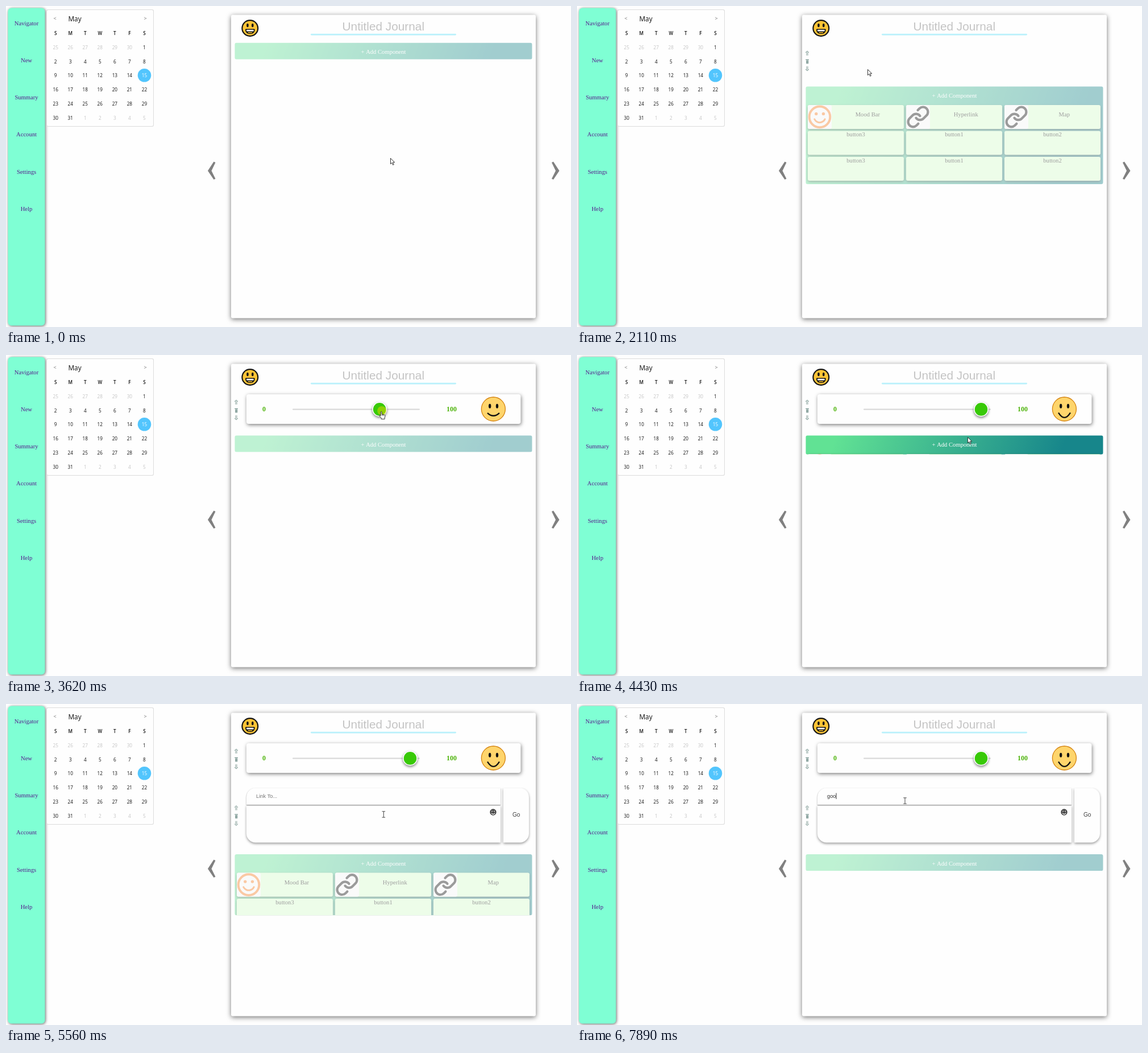
Recreate the animation shown at these times as an HTML page with a canvas. Size 994 by 564 pixels, loop 7.99 s.

```html
<!DOCTYPE html>
<html lang="en">
<head>
<meta charset="utf-8">
<title>Journal editor</title>
<style>
html, body { margin: 0; width: 100%; height: 100%; overflow: hidden; background: #fefefe; }
canvas { display: block; }
</style>
</head>
<body>
<canvas id="stage" width="994" height="564"></canvas>
<script>
const LOOP = 7990;
const SERIF = '"Liberation Serif", serif';
const SANS = '"Liberation Sans", sans-serif';
const UI = '"Open Sans", sans-serif';
const stage = document.getElementById('stage');
const screen = stage.getContext('2d');
const layer = document.createElement('canvas');
layer.width = stage.width;
layer.height = stage.height;
const layerCtx = layer.getContext('2d');
let c = screen;

const LINK = new Path2D('M10 13a5 5 0 0 0 7.54.54l3-3a5 5 0 0 0-7.07-7.07l-1.72 1.71' +
  'M14 11a5 5 0 0 0-7.54-.54l-3 3a5 5 0 0 0 7.07 7.07l1.71-1.71');
const ARROW = new Path2D('M.5 .5V10.6L2.9 8.4L4.6 12.3L6.3 11.6L4.6 7.8H7.8Z');
const HAND = new Path2D('M-1 1Q0-.6 1 1V5.2L5.5 6.2Q7 6.6 6.8 8.2L6 11V13.6H0V11.8L-3.4 8Q-4 6.6-2.4 6.7L-1 8Z');

// Panel: [time, top]; hover: [open, close]
const TOPS = [[0, 64.5], [2100, 141.3], [5425, 264]];
const HOVERS = [[840, 2103], [4408, 5425]];
const CURSORS = [[0, 'arrow'], [1000, 'lightBeam'], [1450, 'arrow'], [1750, 'hand'], [2100, 'arrow'],
  [2650, 'hand'], [4200, 'arrow'], [4600, 'hand'], [5425, 'beam']];
const MOUSE = [[0, 676, 267], [129, 676, 267], [130, 675.5, 267], [330, 675.5, 267], [410, 668, 256],
  [610, 668, 256], [860, 690, 88], [1120, 701, 81], [1450, 701, 81], [1800, 545, 112],
  [2050, 511, 111], [2240, 511, 111], [2750, 619, 100], [2800, 619, 100], [3080, 578, 99],
  [3260, 557, 99], [3410, 557, 99], [3620, 660, 99], [3850, 709, 98], [4000, 714, 98],
  [4150, 714, 98], [4430, 687, 144], [4700, 672, 168], [4920, 665, 177], [5070, 664, 193],
  [5560, 664.5, 194], [6090, 580, 173], [6260, 579, 172], [6540, 579, 172], [6640, 577, 170]];
const TYPED = [[0, ''], [7380, 'g'], [7710, 'go'], [7890, 'goo']];

const at = (list, t) => list.filter(k => k[0] <= t).pop()[1];

function mouseAt(t) {
  const i = MOUSE.findIndex(k => k[0] > t);
  if (i < 0) return MOUSE[MOUSE.length - 1].slice(1);
  const [a, b] = [MOUSE[i - 1], MOUSE[i]];
  const p = (t - a[0]) / (b[0] - a[0]);
  return [a[1] + (b[1] - a[1]) * p, a[2] + (b[2] - a[2]) * p];
}

// cubic-bezier(.25, .1, .25, 1)
function ease(x) {
  if (x <= 0) return 0;
  if (x >= 1) return 1;
  let lo = 0, hi = 1, s = .5;
  for (let i = 0; i < 20; i++) {
    s = (lo + hi) / 2;
    const bx = .75 * s * (1 - s) + s ** 3;
    if (bx < x) lo = s; else hi = s;
  }
  return .3 * s * (1 - s) ** 2 + 3 * s * s * (1 - s) + s ** 3;
}

function text(str, x, y, size, family, color, align = 'center', weight = '') {
  c.font = `${weight} ${size}px ${family}`;
  c.textAlign = align;
  c.fillStyle = color;
  c.fillText(str, x, y);
}

function box(x, y, w, h, r, fill, shadow) {
  c.save();
  if (shadow) [c.shadowOffsetX, c.shadowOffsetY, c.shadowBlur, c.shadowColor] = shadow;
  c.beginPath();
  c.roundRect(x, y, w, h, r);
  c.fillStyle = fill;
  c.fill();
  c.restore();
}

function oval(x, y, rx, ry, fill) {
  c.beginPath();
  c.ellipse(x, y, rx, ry, 0, 0, Math.PI * 2);
  c.fillStyle = fill;
  c.fill();
}

const disc = (x, y, r, fill) => oval(x, y, r, r, fill);

function line(points, color, width) {
  c.beginPath();
  points.forEach(([x, y]) => c.lineTo(x, y));
  c.strokeStyle = color;
  c.lineWidth = width;
  c.stroke();
}

function arc(x, y, r, from, to, color, width) {
  c.beginPath();
  c.arc(x, y, r, from, to);
  c.strokeStyle = color;
  c.lineWidth = width;
  c.stroke();
}

function sidebar() {
  box(3.5, 3.5, 65, 558, 6, '#7fffd4', [1, 1, 5, 'rgba(0,0,0,.6)']);
  ['Navigator', 'New', 'Summary', 'Account', 'Settings', 'Help'].forEach((s, i) =>
    text(s, 36, 34 + i * 65.15, 10.6, SERIF, '#551a8b'));
}

function calendar() {
  box(71, 6, 189, 206, 3, '#dcdcdc');
  box(72, 7, 187, 204, 2.5, '#fefefe');
  text('<', 86, 25, 9, UI, '#777');
  text('>', 245, 25, 9, UI, '#777');
  text('May', 121, 26.5, 11.8, UI, '#111');
  [...'SMTWTFS'].forEach((s, i) => text(s, 87.2 + i * 26.03, 51, 8.2, UI, '#111', 'center', 600));
  disc(243.5, 121.8, 11.8, '#52c5fd');
  for (let i = 0; i < 42; i++) {
    const off = i < 6 || i > 36;
    const day = i < 6 ? 25 + i : (i - 6) % 31 + 1;
    const color = off ? '#c4c4c4' : day === 15 ? '#fff' : '#111';
    text(day, 87.2 + i % 7 * 26.03, 76 + Math.floor(i / 7) * 24.7, 8.2, UI, color);
  }
}

function chevron(x, dir) {
  c.beginPath();
  [[0, 275], [3, 273.5], [13.5, 289.5], [3, 305], [0, 303.5], [7, 289.5]].forEach(([dx, y]) => c.lineTo(x + dir * dx, y));
  c.fillStyle = '#808080';
  c.fill();
}

function page() {
  box(396, 15.5, 536, 533, 3, '#fefefe', [0, 2, 8, 'rgba(0,0,0,.55)']);
  disc(429.3, 39, 15, '#151515');
  disc(429.3, 39, 12.8, '#fcc436');
  oval(425, 34, 1.8, 3.2, '#151515');
  oval(433.8, 34, 1.8, 3.2, '#151515');
  box(421, 40.3, 16.8, 8.8, [1.5, 1.5, 8, 8], '#151515');
  box(423, 41.8, 12.8, 2.6, 1, '#fff');
  box(425.5, 46, 7.8, 1.4, .7, '#fcc436');
  text('Untitled Journal', 663.8, 43, 20.8, SANS, '#c4c4c4');
  box(536, 48.7, 256, 2.7, 1.3, '#b9f1fb');
  chevron(368.5, -1);
  chevron(960, 1);
}

function tools(y) {
  const color = '#71908a';
  [[y, 1], [y + 27, -1]].forEach(([cy, d]) => {
    line([[402.2, cy - d], [405, cy - 4 * d], [407.8, cy - d]], color, 1);
    line([[404, cy - 2 * d], [404, cy + 4 * d]], color, .8);
    line([[406, cy - 2 * d], [406, cy + 4 * d]], color, .8);
  });
  box(402.3, y + 10.7, 5.6, 1.2, 0, color);
  box(403, y + 12.5, 4.4, 6, .8, '#a5b9b5');
  line([[404.3, y + 12.5], [404.3, y + 18]], color, .7);
  line([[406.1, y + 12.5], [406.1, y + 18]], color, .7);
}

function moodBar(knob) {
  box(423, 69, 482.5, 52, 4, '#fefefe', [1, 2, 6, 'rgba(0,0,0,.5)']);
  text('0', 454, 99.3, 12, SERIF, '#4db30a', 'center', 'bold');
  text('100', 784, 99.3, 12, SERIF, '#4db30a', 'center', 'bold');
  box(504, 94.6, 224, 2, 1, '#d6d6d6');
  c.save();
  [c.shadowOffsetY, c.shadowBlur, c.shadowColor] = [2, 4, 'rgba(0,0,0,.5)'];
  disc(knob, 95.4, 13, '#fff');
  c.restore();
  disc(knob, 95.4, 11.3, '#38c908');
  disc(857.4, 95, 21.2, '#ffd56c');
  arc(857.4, 95, 21, 0, 7, '#d48412', 1.3);
  oval(851.2, 89.8, 2.2, 4, '#111');
  oval(864, 89.8, 2.2, 4, '#111');
  const v = (knob - 504) / 224;
  const bend = 17 * (v - .34);
  c.beginPath();
  c.moveTo(847, 102.5 - bend * .12);
  c.quadraticCurveTo(857.5, 102.5 + bend * 1.6, 868, 102.5 - bend * .12);
  c.strokeStyle = '#111';
  c.lineWidth = 2.3;
  c.stroke();
}

function hyperlink(t) {
  const shade = [0, 2, 4, 'rgba(0,0,0,.4)'];
  c.save();
  c.beginPath();
  c.rect(415, 147, 520, 110);
  c.clip();
  box(423, 178, 447, 65.5, [0, 0, 0, 16], '#fefefe', shade);
  box(423, 147.5, 447, 29.5, [16, 0, 0, 0], '#fefefe', [0, 1, 2, 'rgba(0,0,0,.5)']);
  box(875, 147.5, 45, 96, [0, 16, 16, 0], '#fefefe', shade);
  c.restore();
  text('Go', 897.7, 198, 10.2, SANS, '#444');
  disc(857, 190, 5.7, '#484848');
  disc(855, 188.4, .9, '#fff');
  disc(859, 188.4, .9, '#fff');
  arc(857, 190.5, 3, .3, Math.PI - .3, '#fff', 1.1);
  const typed = at(TYPED, t);
  text(typed || 'Link To...', 440, 164.6, 9.3, SANS, typed ? '#333' : '#757575', 'left');
  if (t >= 6540 && t < 7070 || t >= 7380) box(440 + typed.length * 5.2, 156.5, .9, 10.5, 0, '#222');
}

function buttonIcon(x, y, col) {
  box(x, y, 42, 42, 3, '#f5f5f5');
  c.lineCap = 'round';
  if (col === 0) {
    const orange = '#f57c20';
    arc(x + 21, y + 21, 18.3, 0, 7, orange, 4);
    disc(x + 14.8, y + 15.5, 2.7, orange);
    disc(x + 27.5, y + 15.5, 2.7, orange);
    arc(x + 21, y + 20.5, 10.2, .45, Math.PI - .45, orange, 3);
  } else {
    c.save();
    c.translate(x, y);
    c.scale(1.75, 1.75);
    c.strokeStyle = '#0a0a0a';
    c.lineWidth = 2.4;
    c.stroke(LINK);
    c.restore();
  }
  c.lineCap = 'butt';
}

function panel(top, h) {
  const [x, w, turn] = [402.3, 523.4, 110 * Math.PI / 180];
  const [sx, sy] = [Math.sin(turn), -Math.cos(turn)];
  const half = (w * sx + h * sy) / 2;
  const [cx, cy] = [x + w / 2, top + h / 2];
  const g = c.createLinearGradient(cx - sx * half, cy - sy * half, cx + sx * half, cy + sy * half);
  g.addColorStop(.1, '#61e294');
  g.addColorStop(.86, '#17868b');
  c.save();
  c.beginPath();
  c.roundRect(x, top, w, h, 3.5);
  c.clip();
  c.fillStyle = g;
  c.fillRect(x, top, w, h);
  text('+ Add Component', 664, top + 19.6, 10.6, SERIF, '#fff');
  if (h > 30) for (let i = 0; i < 9; i++) {
    const col = i % 3, row = Math.floor(i / 3);
    const bx = 406 + col * 173, by = top + 32.6 + row * 45.5;
    box(bx, by, 169, 42, 3, '#d6fdcc', [0, 2, 4, 'rgba(0,0,0,.6)']);
    if (row) {
      text('button' + [3, 1, 2][col], bx + 84.5, by + 10, 10.6, SERIF, '#111');
    } else {
      buttonIcon(bx, by, col);
      text(['Mood Bar', 'Hyperlink', 'Map'][col], bx + 105.3, by + 20, 10.6, SERIF, '#111');
    }
  }
  c.restore();
}

function addPanel(t) {
  const top = at(TOPS, t);
  let open = 0, hover = false;
  for (const [on, off] of HOVERS) {
    if (t < on) continue;
    hover = t < off;
    open = hover ? ease((t - on) / 500) : 1 - ease((t - off) / 500);
  }
  c = layerCtx;
  c.clearRect(0, 0, layer.width, layer.height);
  panel(top, 29.3 + 143.5 * open);
  c = screen;
  c.globalAlpha = hover ? 1 : .4;
  c.drawImage(layer, 0, 0);
  c.globalAlpha = 1;
}

function cursor(kind, x, y) {
  c.save();
  c.translate(x, y);
  if (kind.endsWith('eam')) {
    const color = kind === 'beam' ? '#555' : '#fff';
    line([[0, -5], [0, 5]], color, 1.1);
    [-5.2, 5.2].forEach(dy => line([[-2.8, dy], [2.8, dy]], color, 1.1));
  } else {
    const shape = kind === 'hand' ? HAND : ARROW;
    c.fillStyle = '#fff';
    c.fill(shape);
    c.strokeStyle = '#222';
    c.lineWidth = .9;
    c.stroke(shape);
    if (kind === 'hand') [1.6, 3.5].forEach(dx => line([[dx, 5.5], [dx, 8]], '#222', .7));
  }
  c.restore();
}

function draw(t) {
  c = screen;
  c.fillStyle = '#fefefe';
  c.fillRect(0, 0, stage.width, stage.height);
  sidebar();
  calendar();
  page();
  const [mx, my] = mouseAt(t);
  const drag = t >= 2800 && t < 4000;
  if (t >= 2100) tools(83);
  if (t >= 2180) moodBar(t < 2800 ? 616 : drag ? mx - 3 : 711);
  if (t >= 5425) {
    tools(182.7);
    hyperlink(t);
  }
  addPanel(t);
  if (drag) disc(mx + 1, my - 1, 8, 'rgba(230,215,0,.5)');
  cursor(at(CURSORS, t), mx, my);
}

const start = performance.now();
function tick() {
  draw((performance.now() - start) % LOOP);
  requestAnimationFrame(tick);
}
tick();
</script>
</body>
</html>
```
